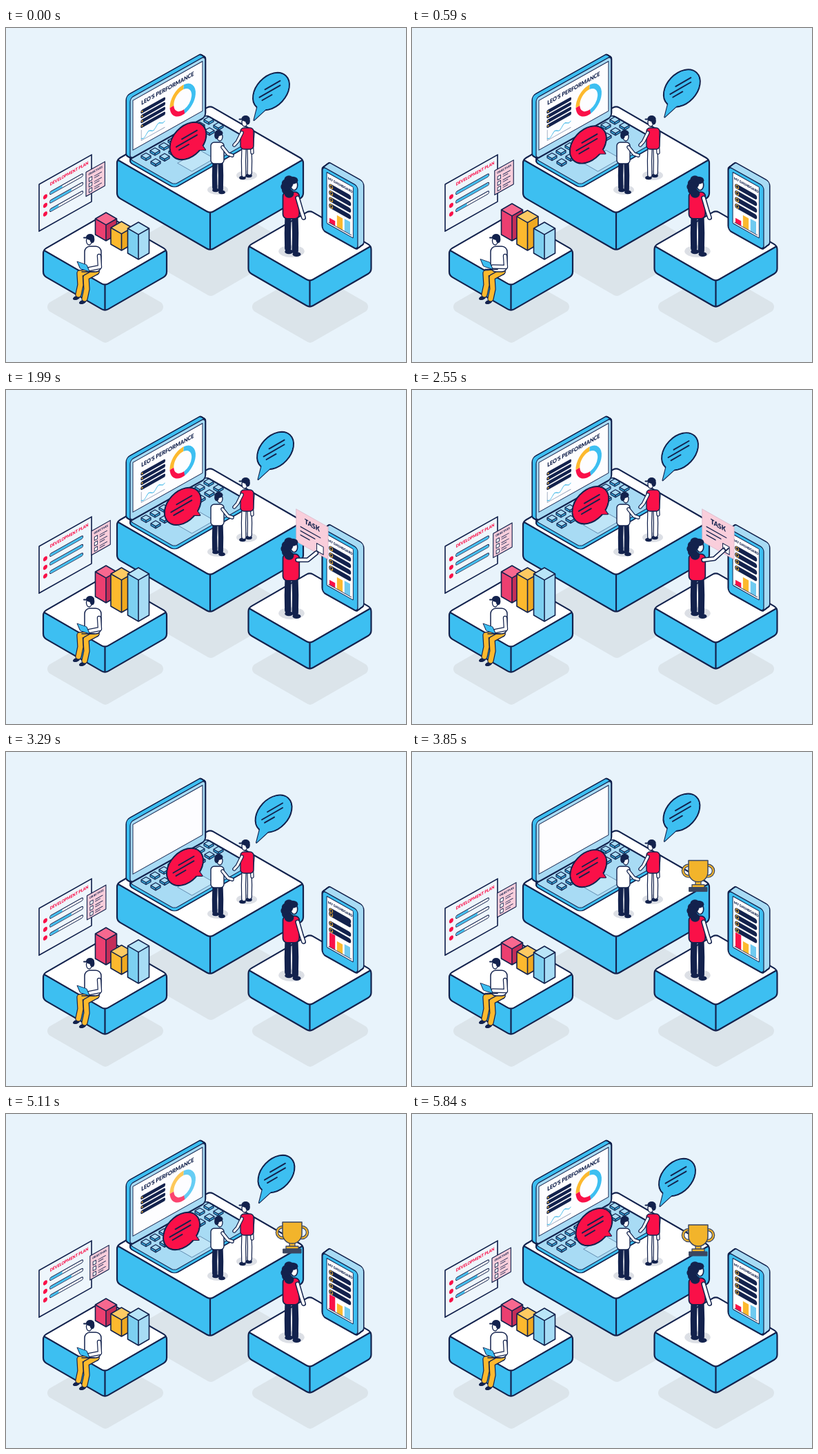
Recreate the animation shown at these times as an HTML page with a canvas. Size 580 by 485 pixels, loop 5.87 s.

```html
<!DOCTYPE html>
<html lang="en">
<head>
<meta charset="utf-8">
<title>Performance dashboard</title>
<style>
html, body { margin: 0; width: 100%; height: 100%; overflow: hidden; background: #e8f3fb; }
canvas { display: block; width: 580px; height: 485px; }
</style>
</head>
<body>
<canvas id="stage"></canvas>
<script>
const W = 580, H = 485, LOOP = 5870;
const canvas = document.getElementById('stage');
const ratio = window.devicePixelRatio || 1;
canvas.width = W * ratio;
canvas.height = H * ratio;
const c = canvas.getContext('2d');

const NAVY = '#13224d', BLUE = '#3dbff1', PALE = '#a8dbf4', RED = '#fa1048', GOLD = '#fdb92e',
  PINK = '#f9cedb', WHITE = '#fff', BG = '#e8f3fb', SHADE = '#dbe4ea';

// Isometric planes: walls rising or falling to the right, and the floor
const ISO = 0.578;
const RISE = [0.87, -0.49, 0, 1], FALL = [0.87, 0.49, 0, 1], FLOOR = [0.87, -0.5, 0.87, 0.5];

// Eased progress of t between a and b
function seg(t, a, b) {
  const p = Math.min(1, Math.max(0, (t - a) / (b - a)));
  return p * p * (3 - 2 * p);
}
const wave = (t, period) => (1 - Math.cos(2 * Math.PI * t / period)) / 2;
const mix = (a, b, p) => a + (b - a) * p;

function paint(fill, stroke, width = 1.8) {
  if (fill) { c.fillStyle = fill; c.fill(); }
  if (stroke) { c.strokeStyle = stroke; c.lineWidth = width; c.stroke(); }
}

function path(pts, r = 0) {
  const n = pts.length, last = pts[n - 1];
  c.beginPath();
  c.moveTo((last[0] + pts[0][0]) / 2, (last[1] + pts[0][1]) / 2);
  pts.forEach((p, i) => c.arcTo(...p, ...pts[(i + 1) % n], r));
  c.closePath();
}

function rect(x, y, w, h, fill, stroke, width, r = 0) {
  c.beginPath();
  c.roundRect(x, y, w, h, r);
  paint(fill, stroke, width);
}

function oval(x, y, rx, ry, fill, stroke, width, turn = 0) {
  c.beginPath();
  c.ellipse(x, y, rx, ry, turn, 0, 7);
  paint(fill, stroke, width);
}

function line(pts, color, width) {
  c.beginPath();
  pts.forEach(p => c.lineTo(...p));
  paint(null, color, width);
}
const dash = (x, y, len, color, width) => line([[x, y], [x + len, y]], color, width);

function limb(pts, width, color) {
  line(pts, NAVY, width + 2.4);
  line(pts, color, width);
}

function text(str, x, y, size, color) {
  c.font = `900 ${size}px Lato, "Open Sans", sans-serif`;
  c.fillStyle = color;
  c.fillText(str, x, y);
}

function group(draw, alpha = 1) {
  if (alpha <= 0) return;
  c.save();
  c.globalAlpha = alpha;
  draw();
  c.restore();
}

const plane = (m, x, y, draw, alpha) => group(() => {
  c.transform(...m, x, y);
  draw();
}, alpha);

const rhomb = (x, y, w) => [[x, y], [x + w, y + w * ISO], [x, y + 2 * w * ISO], [x - w, y + w * ISO]];

function shadow(x, y, w) {
  path(rhomb(x, y - w * ISO, w), 8);
  paint(SHADE);
}

// Isometric block; x, y is the back corner of its top
function block(x, y, w, depth, [top, left, right], width = 1.6, r = 0) {
  const [back, east, south, west] = rhomb(x, y, w);
  const low = ([px, py]) => [px, py + depth];
  const hull = () => path([west, back, east, low(east), low(south), low(west)], r);
  group(() => {
    hull();
    c.clip();
    c.fillStyle = left;
    c.fillRect(x - w, y, w, H);
    c.fillStyle = right;
    c.fillRect(x, y, w, H);
    path([west, back, east, south], 0);
    paint(top);
    c.beginPath();
    c.moveTo(...west);
    c.arcTo(...south, ...east, r);
    c.lineTo(...east);
    paint(null, NAVY, width);
    line([[x, south[1] - r * 0.15], low(south)], NAVY, width);
  });
  hull();
  paint(null, NAVY, width);
}

// Rounded plate on a plane, thickened by the offset dx, dy
function slab(m, x, y, w, h, dx, dy, rim, face) {
  const layer = (k, fill, stroke, width) =>
    plane(m, x + dx * k, y + dy * k, () => rect(0, 0, w, h, fill, stroke, width, 5));
  for (let k = 0; k <= 1; k += 0.1) layer(k, null, NAVY, 3.6);
  for (let k = 1; k >= 0; k -= 0.1) layer(k, rim);
  layer(0, face, NAVY, 1.4);
}

function report(t) {
  const part = i => t < 3600 ? 1 - seg(t, 3000, 3240) : seg(t, 4250 + i * 300, 4620 + i * 300);
  const wipe = (i, draw) => group(draw, part(i));
  c.translate(4.6, 5.5);
  rect(0, 0, 116, 72, '#fdfdff', NAVY, 1.1);
  wipe(0, () => text("LEO'S PERFORMANCE", 14, 13.6, 8.4, NAVY));
  wipe(1, () => {
    for (let y = 23.5; y < 46; y += 7) {
      dash(15.5, y, 36, NAVY, 5.2);
      oval(15.5, y, 1.2, 1.2, GOLD);
    }
  });
  wipe(2, () => {
    c.lineCap = 'butt';
    [RED, GOLD, BLUE].forEach((color, i) => {
      c.beginPath();
      c.arc(83, 40, 18.2, 1.4 + i * 1.7, i === 2 ? 7.7 : 3.1 + i * 1.7);
      paint(null, color, 6.6);
    });
  });
  wipe(3, () => {
    line([[14, 50], [14, 65], [53, 65]], '#8c9bb5', 0.9);
    const curve = [];
    for (let x = 0; x <= 39; x += 3) curve.push([14 + x, 62 - x * 0.2 + 2.5 * Math.sin(x / 2.6)]);
    line(curve, '#4dbde9', 1.1);
  });
}

function laptop(t) {
  slab(FLOOR, 179, 190, 127, 75, 0, 4, BLUE, PALE);
  for (let row = 0; row < 2; row++)
    for (let i = 7; i >= 0; i--)
      block(203 + i * 13 + row * 14, 181.5 - i * 7.5 + row * 8.3, 7, 3, [PALE, BLUE, BLUE], 1.2);
  plane(FLOOR, 249, 196, () => rect(0, 0, 37, 24, '#bfe5f7', '#5f86ab', 0.8));
  slab(RISE, 180, 102, 125, 88, -5, -3, BLUE, PALE);
  plane(RISE, 180, 102, () => report(t));
}

// Tilted speech bubble with its tail towards tx, ty
function bubble(x, y, color, tx, ty) {
  const turn = -0.82, len = Math.hypot(tx, ty), px = -ty / len * 8, py = tx / len * 8;
  group(() => {
    c.translate(x, y);
    oval(0, 0, 31, 21.5, color, NAVY, 2.2, turn);
    line([[tx * 0.45 + px, ty * 0.45 + py], [tx, ty], [tx * 0.45 - px, ty * 0.45 - py]], NAVY, 2.2);
    c.fillStyle = color;
    c.fill();
    oval(0, 0, 30, 20.5, color, null, 0, turn);
    [11, 15, 7].forEach((half, i) => {
      const cx = 2 - 4 * i, cy = 9 * i - 9;
      line([[cx - half, cy + half * ISO], [cx + half, cy - half * ISO]], NAVY, 1.9);
    });
  });
}

// Head looking right
function head(x, y, cap) {
  oval(x + 1.5, y, 4, 6, WHITE, NAVY, 1.3);
  oval(x, y - 5.5, 6, 4.4, NAVY);
  oval(x - 3, y - 2, 3.4, 5.2, NAVY);
  if (cap) dash(x + 3, y - 4.5, 6, NAVY, 2);
}

function arm(x, y, hx, hy, width) {
  limb([[x, y], [(x + hx) / 2 + 1, (y + hy) / 2 + 4], [hx, hy]], width, WHITE);
}

// Standing figure; x, y is the ground point, dir the way it looks
function stander(x, y, size, dir, shirt, legs, hand, extras = {}) {
  group(() => {
    c.translate(x, y);
    c.scale(size * dir, size);
    oval(0, -3, 15, 7, '#dcdfe5');
    for (const side of [-1, 1]) {
      oval(side * 4.5 + 1.5, side * 1.5 - 1, 4.8, 2.7, NAVY);
      limb([[side * 4, -42], [side * 4.5, -24], [side * 4.2, side * 1.5 - 5]], 5, legs);
    }
    if (extras.cap) arm(-9, -65, -8, -36, 3);
    rect(-10, -72, 19, 31, shirt, NAVY, 1.4, 5);
    arm(7, -65, ...hand, 3.2);
    head(1.5, -80, extras.cap);
    if (extras.curls)
      for (let i = 0; i < 5; i++) oval(-3 - 4 * Math.sin(i * 0.8), -86 + i * 4, 5.5, 5, NAVY);
  });
}

function seatedMan(up) {
  for (const k of [0, 1]) {
    const x = 104 + 9 * k, y = 391 + 6 * k;
    oval(x - 2, y + 1, 5.2, 2.8, NAVY, null, 0, -0.3);
    limb([[131, 354], [x + 3, y - 35], [x + 4, y - 18], [x + 1, y - 4]], 7, GOLD);
  }
  rect(114, 317, 24, 37, WHITE, NAVY, 1.5, 8);
  group(() => {
    c.translate(122, 309);
    c.scale(-1, 1);
    head(0, 0, true);
  });
  const x = 103 - 4 * up, y = 339 - 3.5 * up;
  limb([[135, 331], [136, 347], [x + 18, y + 11]], 4, WHITE);
  plane([0.87, 0.3, 0.35, 0.8], x, y, () => rect(0, 0, 16, 13, BLUE, NAVY, 1.4, 1));
  dash(x + 7, y + 15, 18, NAVY, 1.6);
}

function plan(t) {
  const reset = seg(t, 2600, 2930);
  plane(RISE, 48, 227, () => {
    rect(0, 0, 87.4, 68, '#eef6fc', NAVY, 1.9);
    text('DEVELOPMENT PLAN', 18, 11, 6.2, RED);
    [0.34, 0.64, 0.22].forEach((part, i) => {
      const y = 22 + i * 12.5;
      const full = mix(part, 1, seg(t, i * 260, i * 260 + 360) * (1 - reset));
      oval(10.3, y + 1, 3.5, 3.3, RED);
      dash(20, y, 51, NAVY, 5.2);
      dash(20, y, 51, WHITE, 3);
      dash(20, y, 51 * full, BLUE, 3);
    });
  });
}

function objectives(t) {
  const d = wave(t, LOOP / 2);
  plane(RISE, 116 + 11 * d, 209.5 - 6.5 * d, () => {
    rect(0, 0, 31.5, 35, PINK, NAVY, 1.3);
    text('OBJECTIVES', 4, 6.8, 4, NAVY);
    for (let y = 11; y < 30; y += 8) {
      rect(5, y, 5, 5, WHITE, NAVY, 1);
      dash(14, y + 1.2, 12, NAVY, 0.9);
      dash(14, y + 4, 8, NAVY, 0.9);
    }
  });
}

function chart(t) {
  const bar = (x, low, high, base, rise, fall, colors) => {
    const y = mix(low, high, seg(t, rise, rise + 420) - seg(t, fall, fall + 330));
    block(x, y, 15.5, base - y - 31 * ISO, colors);
  };
  bar(145, 268, 255, 309, 0, 3520, ['#f7688f', '#ec3f70', '#c42d59']);
  bar(167.5, 281, 258, 323, 320, 2990, ['#fdca62', GOLD, '#f0a91f']);
  bar(192, 282, 258, 336, 740, 3100, ['#b9e5f8', '#7dd0f1', '#a7dcf5']);
}

function phone(t) {
  const shift = seg(t, 2860, 3230) - seg(t, 5400, 5780);
  const hop = seg(t, 3080, 3270) - seg(t, 3310, 3500);
  slab(FALL, 459, 201, 58.6, 92, 8, -6, PALE, BLUE);
  plane(FALL, 459, 201, () => {
    rect(7, 5, 44, 74, WHITE, NAVY, 1.1, 1);
    text('MY DASHBOARD', 9, 14.3, 5, NAVY);
    for (let i = 0; i < 4; i++) {
      const y = 22.5 + i * 9.5 - (i === 1 ? 4 * hop : 0);
      dash(14, y, 30, NAVY, 7);
      oval(14.5, y, 2.3, 2.3, null, GOLD, 1.1);
    }
    const before = [7, 17, 18], after = [21, 14, 16];
    [RED, GOLD, '#6fcaf0'].forEach((color, i) => {
      const h = mix(before[i], after[i], shift);
      rect(11.5 + i * 12.5, 76 - h, 9.5, h, color);
    });
    dash(10, 76.3, 38, NAVY, 0.8);
  });
}

function card(t) {
  const show = seg(t, 1230, 1400) - seg(t, 2720, 2950);
  const drop = 11 * (1 - seg(t, 1250, 1750));
  const tick = seg(t, 2130, 2330);
  plane(FALL, 421, 173 - drop, () => {
    rect(0, 0, 53, 47, PINK, '#d8b3c6', 0.7);
    text('TASK', 13.8, 14, 10, NAVY);
    for (let i = 0; i < 3; i++) dash(7, 22 + i * 6, 33 - i * 9, NAVY, 1.4);
    rect(34, 33, 11, 11, WHITE, NAVY, 1.2);
    if (tick) line([[36, 38], [36 + 3 * tick, 38 + 3.5 * tick], [36 + 8 * tick, 38 - 3 * tick]], NAVY, 1.6);
  }, show);
}

function trophy(t, bob) {
  const edge = '#3b4660', fill = '#f2b42b';
  const show = seg(t, 3500, 3850);
  group(() => {
    c.translate(415, 183 - 4 * bob);
    for (const side of [-1, 1]) {
      oval(side * 14, -7, 8, 8, null, edge, 4.6);
      oval(side * 14, -7, 8, 8, null, fill, 2.2);
    }
    rect(-4, 5, 8, 11, fill, edge, 1.3);
    rect(-14, -22, 28, 31, fill, edge, 1.5, [0, 0, 14, 14]);
    rect(-9, 13, 18, 4, fill, edge, 1.3);
    rect(-13, 17, 26, 6, edge, edge, 1);
  }, show);
}

function draw(t) {
  c.setTransform(ratio, 0, 0, ratio, 0, 0);
  c.lineCap = c.lineJoin = 'round';
  c.fillStyle = BG;
  c.fillRect(0, 0, W, H);

  shadow(297, 318, 125);
  shadow(144, 405, 92);
  shadow(441, 405, 92);

  const slabColors = [WHITE, BLUE, BLUE];
  const bob = wave(t, LOOP / 4);

  block(296, 113, 135, 54, slabColors, 2.2, 9);
  laptop(t);
  bubble(264 - 9.5 * bob, 164 + 6 * bob, RED, 25, 13);
  stander(349, 217, 1, -1, RED, WHITE, [18, -47], { cap: true });
  stander(307, 238, 1, 1, WHITE, NAVY, [21, -53]);
  bubble(384.5 + 7.5 * bob, 92 - 5 * bob, BLUE, -25, 42);

  block(143.5, 270.5, 89.5, 37, slabColors, 2.2, 9);
  plan(t);
  objectives(t);
  chart(t);
  const half = t % (LOOP / 2);
  seatedMan(seg(half, 370, 570) - seg(half, 1530, 1930));

  block(440.5, 265, 89, 38, slabColors, 2.2, 9);
  phone(t);
  card(t);
  const lift = seg(t, 1720, 2050) - seg(t, 2640, 2920);
  stander(414, 328, 1.25, 1, RED, NAVY, [mix(14, 30, lift), mix(-42, -76, lift)], { curls: true });
  trophy(t, bob);
}

let start;
function tick(now) {
  if (start === undefined) start = now;
  draw((now - start) % LOOP);
  requestAnimationFrame(tick);
}
draw(0);
requestAnimationFrame(tick);
</script>
</body>
</html>
```
